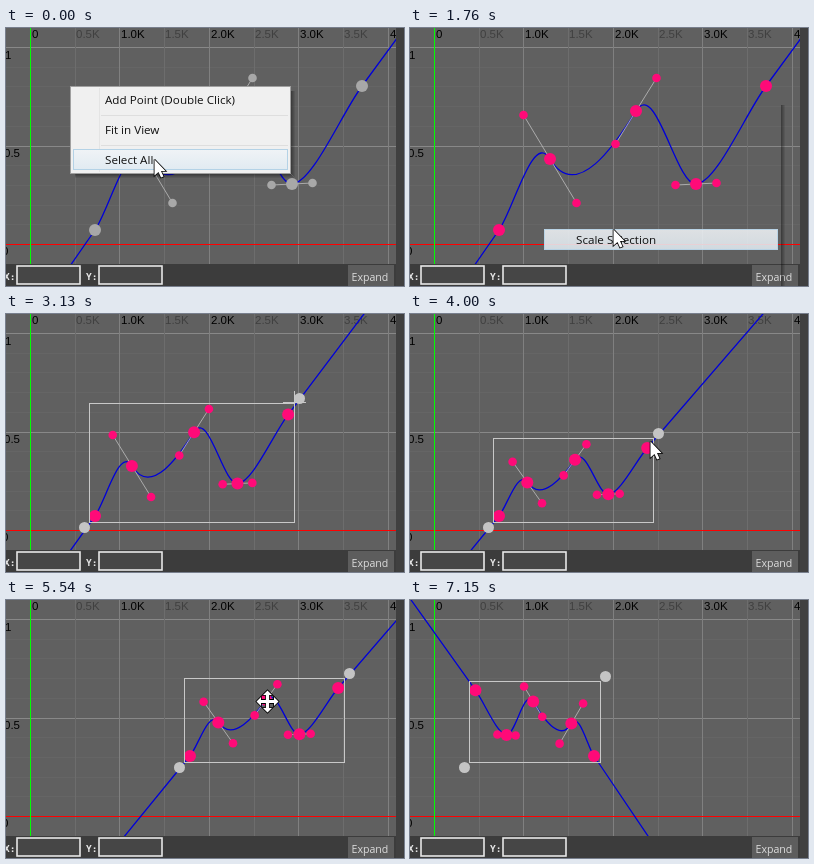
Write an HTML page with a canvas that moves like this. It is 398 px wide and 258 px high and loops after 7810 ms.

```html
<!DOCTYPE html>
<html lang="en">
<head>
<meta charset="utf-8">
<title>Curve editor: scale and move a selection</title>
<style>
html, body { margin: 0; width: 100%; height: 100%; overflow: hidden; background: #3c3c3c; }
canvas { display: block; width: 398px; height: 258px; }
</style>
</head>
<body>
<canvas id="stage"></canvas>
<script>
const W = 398, H = 258, LOOP = 7810;
const PLOT_W = 390, PLOT_H = 236;
const canvas = document.getElementById('stage');
const ratio = window.devicePixelRatio || 1;
canvas.width = W * ratio;
canvas.height = H * ratio;
const ctx = canvas.getContext('2d');
ctx.scale(ratio, ratio);

const AXIS_FONT = '11.5px "Liberation Sans", Arial, sans-serif';
const MENU_FONT = '11.65px "Open Sans", sans-serif';
const BAR_FONT = '10.6px "Open Sans", sans-serif';
const MONO_FONT = 'bold 9.5px "DejaVu Sans Mono", monospace';
const PINK = '#ff0a78', GREY = '#a8a8a8', KNOB = '#c4c4c4';

// Knots relative to the first one, each with a symmetric tangent.
const KNOTS = [
  { x: 0, y: 0, dx: 15, dy: -21.6 },
  { x: 51, y: -71, dx: 26.5, dy: 44, handles: true },
  { x: 137, y: -119, dx: 20.5, dy: -33, handles: true },
  { x: 197, y: -46, dx: 20.5, dy: -1, handles: true },
  { x: 267, y: -144, dx: 21, dy: -28.6 }
];

const ROW = 22, GAP = 8, RULE = null;
const MENU_A = layout({ x: 64, y: 58, w: 221, h: 88 },
  ['Add Point (Double Click)', RULE, 'Fit in View', RULE, 'Select All']);
const MENU_B = layout({ x: 131, y: 72, w: 240, h: 220 },
  ['Add Point (Double Click)', RULE, 'Make Linear', 'Make Spline', 'Make Smooth Bezier',
    'Make Free Bezier', RULE, 'Scale Selection', 'Fit Selection in View']);

function layout(menu, entries) {
  menu.items = [];
  menu.rules = [];
  let y = menu.y + 14;
  for (const label of entries) {
    if (label === RULE) {
      menu.rules.push(y - 7);
      y += GAP;
    } else {
      menu.items.push({ y, label });
      y += ROW;
    }
  }
  return menu;
}

const lerp = (a, b, k) => a + (b - a) * k;
const progress = (t, from, to) => Math.max(0, Math.min(1, (t - from) / (to - from)));
const glide = (t, from, to) => {
  const u = progress(t, from, to);
  return u * u * (3 - 2 * u);
};
const easeOut = (t, from, to) => 1 - (1 - progress(t, from, to)) ** 2;

// How far each drag has come; the shrink pauses once on its way.
function dragsAt(t) {
  const first = easeOut(t, 2770, 3320), second = glide(t, 3490, 3880);
  return {
    shrinkX: lerp(first * .705, 1, second),
    shrinkY: lerp(first * .635, 1, second),
    move: glide(t, 4740, 5380),
    flip: glide(t, 6360, 6850)
  };
}

function poseAt({ shrinkX, shrinkY, move, flip }) {
  return {
    x: lerp(89, 184, move),
    y: lerp(202, 156, move),
    sx: lerp(lerp(1, .555, shrinkX), -.444, flip),
    sy: lerp(lerp(1, .472, shrinkY), .457, flip)
  };
}

function pointerAt(t, drags) {
  let x = 148, y = 131;
  const go = (toX, toY, kx, ky = kx) => {
    x = lerp(x, toX, kx);
    y = lerp(y, toY, ky);
  };
  go(132, 73, glide(t, 500, 820));
  go(203, 201, glide(t, 960, 1600));
  go(368, 38, glide(t, 1800, 2300));
  go(240, 127, drags.shrinkX, drags.shrinkY);
  go(166, 147, glide(t, 4000, 4500));
  go(261, 101, drags.move);
  go(346, 74, glide(t, 5540, 6100));
  go(60, 80, drags.flip);
  go(127, 118, glide(t, 6850, 7120));
  return [Math.round(x), Math.round(y)];
}

function rect(x, y, w, h, fill) {
  ctx.fillStyle = fill;
  ctx.fillRect(x, y, w, h);
}

function frame(x, y, w, h, color, width = 1) {
  ctx.strokeStyle = color;
  ctx.lineWidth = width;
  ctx.strokeRect(x, y, w, h);
}

function text(str, x, y, font, color) {
  ctx.font = font;
  ctx.fillStyle = color;
  ctx.fillText(str, x, y);
}

function dot([x, y], r, color) {
  ctx.fillStyle = color;
  ctx.beginPath();
  ctx.arc(x, y, r, 0, 7);
  ctx.fill();
}

function polyline(points, color, width) {
  ctx.beginPath();
  points.forEach(p => ctx.lineTo(...p));
  ctx.strokeStyle = color;
  ctx.lineWidth = width;
  ctx.stroke();
}

function polygon(points, fill, stroke) {
  polyline([...points, points[0]], stroke, 1.6);
  ctx.fillStyle = fill;
  ctx.fill();
}

const columnX = i => Math.round(24 + i * 44.7);

function drawGrid() {
  rect(0, 0, PLOT_W, PLOT_H, '#606060');
  for (let i = 0; i <= 10; i++) {
    rect(0, Math.round(19 + i * 19.7), PLOT_W, 1, i % 5 ? '#656565' : '#888');
  }
  for (let i = 0; i < 9; i++) {
    rect(columnX(i), 0, 1, PLOT_H, i % 2 ? '#6d6d6d' : '#808080');
  }
  rect(0, 216, PLOT_W, 1, '#f00');
  rect(24, 0, 1, PLOT_H, '#0f0');
}

function drawLabels() {
  for (let i = 0; i < 9; i++) {
    const label = i ? (i / 2).toFixed(1) + 'K' : '0';
    text(label, columnX(i) + 2 - i % 2, 10, AXIS_FONT, i % 2 ? '#404040' : '#000');
  }
  text('1', -1, 31, AXIS_FONT, '#000');
  text('0.5', -2, 129, AXIS_FONT, '#000');
  text('0', -4, 227, AXIS_FONT, '#000');
}

function drawField(label, x) {
  text(label, x - 13, 252, MONO_FONT, '#e6e6e6');
  rect(x, 238, 63, 18, '#464646');
  frame(x, 238, 63, 18, '#e8e8e8', 1.6);
}

function drawBar() {
  rect(0, PLOT_H, W, H - PLOT_H, '#3c3c3c');
  rect(PLOT_W, 0, W - PLOT_W, H, '#404040');
  drawField('X:', 11);
  drawField('Y:', 93);
  rect(342, 237, 46, 21, '#5d5d5d');
  text('Expand', 345.5, 253, BAR_FONT, '#dcdcdc');
}

function drawCurve(pose, selected, boxed) {
  // Point on a knot's tangent, k tangent lengths away from it.
  const at = (knot, k = 0) => [
    pose.x + (knot.x + knot.dx * k) * pose.sx,
    pose.y + (knot.y + knot.dy * k) * pose.sy
  ];
  const first = KNOTS[0], last = KNOTS[KNOTS.length - 1];

  ctx.beginPath();
  ctx.moveTo(...at(first, -99));
  ctx.lineTo(...at(first));
  KNOTS.slice(1).forEach((knot, i) => {
    const from = KNOTS[i], third = (knot.x - from.x) / 3;
    const limit = k => Math.min(1, third / k.dx);
    ctx.bezierCurveTo(...at(from, limit(from)), ...at(knot, -limit(knot)), ...at(knot));
  });
  ctx.lineTo(...at(last, 99));
  ctx.strokeStyle = '#0000d8';
  ctx.lineWidth = 1.3;
  ctx.stroke();

  const color = selected ? PINK : GREY;
  const points = [];
  for (const knot of KNOTS) {
    if (knot.handles) {
      const ends = [at(knot, -1), at(knot, 1)];
      polyline(ends, '#b4b4b4', .9);
      ends.forEach(p => dot(p, 4.3, color));
      points.push(...ends);
    }
    dot(at(knot), 6, color);
    points.push(at(knot));
  }
  if (boxed) drawBox(points);
}

function drawBox(points) {
  const xs = points.map(p => p[0]), ys = points.map(p => p[1]);
  const edge = v => Math.round(v) + .5;
  const left = edge(Math.min(...xs) - 6), right = edge(Math.max(...xs) + 6);
  const top = edge(Math.min(...ys) - 6), bottom = edge(Math.max(...ys) + 6);
  frame(left, top, right - left, bottom - top, '#c8c8c8');
  dot([left - 5, bottom + 5], 5.5, KNOB);
  dot([right + 5, top - 5], 5.5, KNOB);
}

function drawItem(menu, { y, label }, hot, alpha) {
  if (hot) {
    ctx.globalAlpha = alpha;
    const shine = ctx.createLinearGradient(0, y - 11, 0, y + 11);
    shine.addColorStop(0, '#f0f3f6');
    shine.addColorStop(1, '#e0eaf1');
    rect(menu.x + 3, y - 11, menu.w - 6, 21, shine);
    frame(menu.x + 3.5, y - 10.5, menu.w - 7, 20, '#b4d2e6');
  }
  ctx.globalAlpha = Math.min(1, alpha * 1.4);
  text(label, menu.x + 35, y + 4, MENU_FONT, '#101010');
  ctx.globalAlpha = 1;
}

function drawShadow({ x, y, w, h }) {
  for (let i = 0; i < 4; i++) {
    const shade = `rgba(0,0,0,${.36 - i * .09})`;
    rect(x + w + i, y + 5, 1, h - 5 + i, shade);
    rect(x + 5, y + h + i, w - 5 + i, 1, shade);
  }
}

function drawMenu(menu, pointerY, alpha) {
  const { x, y, w, h } = menu;
  drawShadow(menu);
  ctx.globalAlpha = alpha;
  rect(x, y, w, h, '#f0f0f0');
  frame(x + .5, y + .5, w - 1, h - 1, '#a0a0a0');
  rect(x + 29, y + 2, 1, h - 4, '#e4e4e4');
  menu.rules.forEach(r => rect(x + 31, r, w - 34, 1, '#dedede'));
  for (const item of menu.items) {
    const hot = pointerY > y + 4 && Math.abs(pointerY - item.y) <= ROW / 2;
    drawItem(menu, item, hot, alpha);
  }
}

// The chosen item lingers for a moment after its menu has closed.
function drawChosen(menu, label, closedFor) {
  const alpha = 1 - closedFor / 250;
  if (alpha > 0) drawItem(menu, menu.items.find(item => item.label === label), true, alpha);
}

function drawMenus(t, pointerY) {
  if (t < 510) drawMenu(MENU_A, pointerY, 1);
  else drawChosen(MENU_A, 'Select All', t - 510);

  if (t >= 800 && t < 1730) {
    drawMenu(MENU_B, pointerY, progress(t, 800, 972));
  } else if (t >= 1730) {
    if (t < 1790) drawShadow(MENU_B);
    drawChosen(MENU_B, 'Scale Selection', t - 1730);
  }
}

const ARROW = [[0, 0], [0, 16], [4, 12.5], [6.5, 18], [9, 17], [6.5, 11.5], [11, 11.5]];
const ARM = [[-1.6, -1.6], [-1.6, -6.5], [-4.5, -6.5], [0, -11], [4.5, -6.5], [1.6, -6.5]];
const FOUR_WAY = [0, 1, 2, 3].flatMap(q => ARM.map(([x, y]) =>
  [[x, y], [-y, x], [-x, -y], [y, -x]][q]));

function drawPointer(t, [x, y]) {
  if (t >= 7150) return;
  const scaling = (t >= 2770 && t < 3880) || (t >= 6360 && t < 6850);
  const moving = t >= 4500 && t < 5570;
  ctx.save();
  ctx.translate(x + .5, y + .5);
  if (scaling) {
    rect(-11.5, -.5, 23, 1, '#c8c8c8');
    rect(-.5, -11.5, 1, 23, '#c8c8c8');
  } else {
    polygon(moving ? FOUR_WAY : ARROW, '#fff', '#000');
  }
  ctx.restore();
}

function draw(t) {
  const drags = dragsAt(t), pointer = pointerAt(t, drags);
  drawGrid();
  ctx.save();
  ctx.beginPath();
  ctx.rect(0, 0, PLOT_W, PLOT_H);
  ctx.clip();
  drawLabels();
  drawCurve(poseAt(drags), t >= 540, t >= 1880);
  ctx.restore();
  drawBar();
  drawMenus(t, pointer[1]);
  drawPointer(t, pointer);
}

const began = performance.now();
function tick() {
  draw((performance.now() - began) % LOOP);
  requestAnimationFrame(tick);
}
tick();
</script>
</body>
</html>
```
